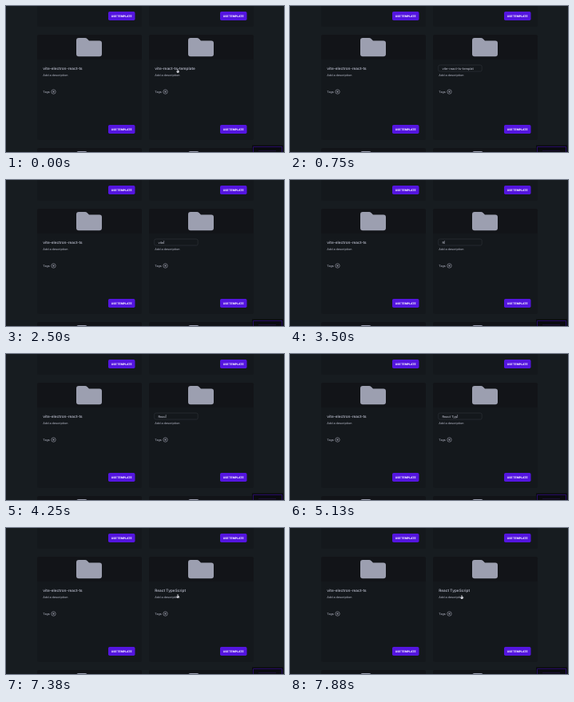
Animation of 348 by 183 pixels, one loop 8000 ms. Source, as an HTML page:

```html
<!DOCTYPE html>
<html lang="en">
<head>
<meta charset="utf-8">
<title>Rename a template</title>
<style>
  html, body { margin: 0; width: 100%; height: 100%; overflow: hidden; background: #171c20; }
  svg { display: block; width: 100vw; height: 100vh; }
  text { font-family: Inter, sans-serif; fill: #a4a7b5; text-rendering: geometricPrecision; white-space: pre; }
  .title { font-size: 4.7px; font-weight: 600; fill: #b0b3c2; }
  .small { font-size: 3.7px; font-weight: 500; }
  .button { font-size: 3.4px; font-weight: 800; fill: #f0eaff; text-anchor: middle; }
  .field { font-size: 3.95px; font-weight: 500; fill: #b4b7c4; }
</style>
</head>
<body>
<svg viewBox="0 0 348 183">
  <defs>
    <g id="card">
      <rect width="131" height="132" rx="2.5" fill="#14181c"/>
      <path d="M0 31V2.5A2.5 2.5 0 0 1 2.5 0H128.5A2.5 2.5 0 0 1 131 2.5V31Z" fill="#121418"/>
      <path d="M49 7a3 3 0 0 1 3-3h8q1.500 0 2.500 1l2.500 2.500H78a3 3 0 0 1 3 3V24.200a3 3 0 0 1-3 3H52a3 3 0 0 1-3-3Z" fill="#9c9fb0"/>
      <text class="small" x="7.3" y="52">Add a description</text>
      <text class="small" x="7.3" y="73">Tags</text>
      <circle cx="20.5" cy="71.5" r="2.7" fill="none" stroke="#a4a7b5" stroke-width=".6"/>
      <path d="M19.2 71.5h2.6M20.5 70.2v2.6" stroke="#a4a7b5" stroke-width=".6"/>
      <rect x="89" y="113" width="33.5" height="11" rx="1.8" fill="#5415df"/>
      <text class="button" x="105.7" y="119.900">USE TEMPLATE</text>
    </g>
  </defs>
  <rect width="348" height="183" fill="#171c20"/>
  <g id="cards"></g>
  <text class="title" x="46.3" y="80">vite-electron-react-ts</text>
  <text class="title" id="title" x="186.3" y="80"></text>
  <g id="editor">
    <rect x="185.7" y="74" width="54.5" height="8" rx="2" fill="#14181c" stroke="#30343b" stroke-width=".6"/>
    <text class="field" id="field" x="190.5" y="79.5"></text>
    <path id="caret" d="M0 76v4" stroke="#b4b7c4" stroke-width=".5"/>
  </g>
  <g>
    <rect x="308" y="174.500" width="39" height="9" fill="#0a0a10"/>
    <path d="M309.500 183V176.500H345.500V183" fill="none" stroke="#2b0e6c" stroke-width=".9"/>
    <path d="M316 181.500h22" stroke="#20103f" stroke-width=".8"/>
  </g>
  <path id="cursor" d="M-.6-2.500q.6-.6 1.200 0v2l1.400.5v1.500l-.6 1.300h-2.200l-1.300-2 .5-.5 1 .5Z" fill="#d4d5dc"/>
</svg>
<script>
const LOOP = 8000, OPEN = 500, CLOSE = 6750;
const OLD = "vite-react-ts-template", NEW = "React TypeScript";
// [time, characters left or typed]
const ERASE = [[0, 21], [1050, 21], [2000, 9], [2500, 4], [2880, 0]];
const TYPE = [[3400, 0], [3500, 1], [4500, 5], [4750, 6], [5130, 9], [5500, 10], [5900, 10], [6000, 11], [6500, 16]];
const CARET_OFF = [[OPEN, 1050], [2880, 3130], [5700, 6000], [6500, CLOSE]];
const el = id => document.getElementById(id);
const show = (id, visible) => el(id).style.display = visible ? "" : "none";

el("cards").innerHTML = [-106, 36, 178].flatMap(y =>
  [39, 179].map(x => `<use href="#card" x="${x}" y="${y}"/>`)).join("");

function track(keys, t) {
  const next = keys.findIndex(key => key[0] > t);
  if (next === 0) return keys[0][1];
  if (next < 0) return keys.at(-1)[1];
  const [t0, a] = keys[next - 1], [t1, b] = keys[next];
  return a + (b - a) * (t - t0) / (t1 - t0);
}

function draw(now) {
  const t = now % LOOP;
  const editing = t >= OPEN && t < CLOSE;
  el("title").textContent = editing ? "" : t < OPEN ? OLD : NEW;
  show("editor", editing);
  if (editing) {
    const text = t < TYPE[0][0]
      ? OLD.slice(0, Math.ceil(track(ERASE, t)))
      : NEW.slice(0, Math.floor(track(TYPE, t) + 1e-6));
    el("field").textContent = text;
    const x = 190.8 + (text ? el("field").getComputedTextLength() : 0);
    el("caret").setAttribute("transform", `translate(${x} 0)`);
    show("caret", !CARET_OFF.some(([from, to]) => t >= from && t < to));
  }
  show("cursor", t < OPEN || t >= 7130);
  const y = t < OPEN ? 81.3 : track([[7130, 84], [7600, 86.5]], t);
  el("cursor").setAttribute("transform", `translate(215 ${y}) scale(.85)`);
  requestAnimationFrame(draw);
}
requestAnimationFrame(draw);
</script>
</body>
</html>
```
